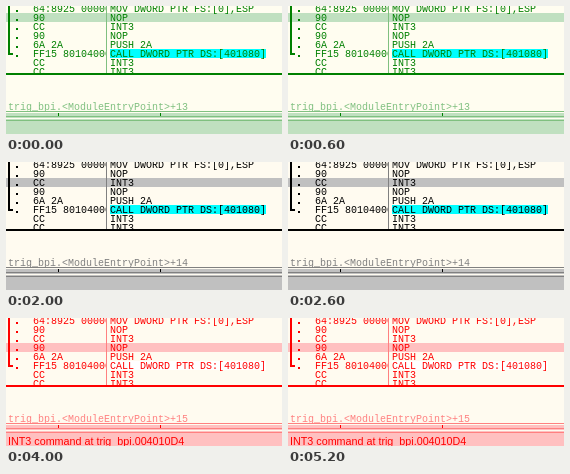
An HTML page for the animation above (6 s loop, 276x128 px).

```html
<!DOCTYPE html>
<html lang="en">
<head>
<meta charset="utf-8">
<title>Stepping through breakpoints</title>
<style>
html, body { margin: 0; width: 276px; height: 128px; overflow: hidden; }
svg { display: block; background: var(--paper); }
text { white-space: pre; fill: var(--ink); }
.code { font: 10px "Liberation Mono", "Courier New", monospace; }
.ui { font: 10.75px "Liberation Sans", Arial, sans-serif; }
.ink { fill: var(--ink); }
.paper { fill: var(--paper); }
.face { fill: var(--face); }
.dim { fill: var(--dim); }
.call { fill: var(--call); }
</style>
</head>
<body>
<svg id="stage" width="276" height="128" viewBox="0 0 276 128"></svg>
<script>
const LOOP = 6000, ROW = 9, TOP = -2;
const stage = document.getElementById("stage");

const themes = {
  green: { ink: "#008000", paper: "#fffdf0", face: "#c0e0c0", dim: "#80c080", call: "#00ffff" },
  plain: { ink: "#000000", paper: "#fffbf0", face: "#c0c0c0", dim: "#808080", call: "#00ffff" },
  red:   { ink: "#ff0000", paper: "#fffbf0", face: "#ffc0c0", dim: "#ff8080", call: "#ffffff" }
};

// start time, theme, selected row, offset from the entry point, status shown
const steps = [
  [0,    "green", 1, 13, false],
  [1000, "plain", 1, 13, false],
  [2000, "plain", 2, 14, false],
  [3000, "plain", 3, 15, true],
  [4000, "red",   3, 15, true]
];

const listing = [
  ["64:8925 00000000", "MOV DWORD PTR FS:[0],ESP"],
  ["90", "NOP"],
  ["CC", "INT3"],
  ["90", "NOP"],
  ["6A 2A", "PUSH 2A"],
  ["FF15 80104000", "CALL DWORD PTR DS:[401080]"],
  ["CC", "INT3"],
  ["CC", "INT3"]
];

function add(tag, attrs, parent = stage) {
  const el = document.createElementNS("http://www.w3.org/2000/svg", tag);
  for (const key in attrs) el.setAttribute(key, attrs[key]);
  parent.append(el);
  return el;
}

function box(cls, x, y, width, height, parent) {
  return add("rect", { class: cls, x, y, width, height, "shape-rendering": "crispEdges" }, parent);
}

function label(cls, x, y, str, parent) {
  const el = add("text", { class: cls, x, y }, parent);
  el.textContent = str;
  return el;
}

const marker = box("face", 0, 0, 276, ROW);
box("call", 104, TOP + 5 * ROW, 156, ROW);

const clip = add("clipPath", { id: "hexColumn" });
box("", 0, 0, 100, 70, clip);
const hex = add("g", { "clip-path": "url(#hexColumn)" });

listing.forEach(([bytes, command], i) => {
  const y = TOP + i * ROW + 8;
  label("code", 27, y, bytes, hex);
  label("code", 104, y, command);
  if (i < 6) box("ink", 10, y - 2, 2, 2);
});

// bracket around the procedure, and the column line
box("ink", 2, 0, 2, 49);
box("ink", 2, 47, 5, 2);
box("dim", 100, 0, 1, 67);

// info pane
box("paper", 0, 67, 276, 38);
box("ink", 0, 67, 276, 2);
const info = label("code", 2, 104, "");
info.style.fill = "var(--dim)";

// table header and status bar
box("face", 0, 105, 276, 23);
for (const y of [105, 110, 114]) box("dim", 0, y, 276, 1);
for (const y of [106, 112]) box("paper", 0, y, 276, 1);
for (const x of [52, 154]) box("ink", x, 107, 1, 3);
const status = label("ui", 2, 127, "INT3 command at trig_bpi.004010D4");

function draw(time) {
  const [, theme, row, offset, shown] = steps.findLast(step => step[0] <= time);
  for (const key in themes[theme]) stage.style.setProperty("--" + key, themes[theme][key]);
  marker.setAttribute("y", TOP + row * ROW);
  info.textContent = "trig_bpi.<ModuleEntryPoint>+" + offset;
  status.style.display = shown ? "" : "none";
}

const start = performance.now();
function tick() {
  draw((performance.now() - start) % LOOP);
  requestAnimationFrame(tick);
}
tick();
</script>
</body>
</html>
```
